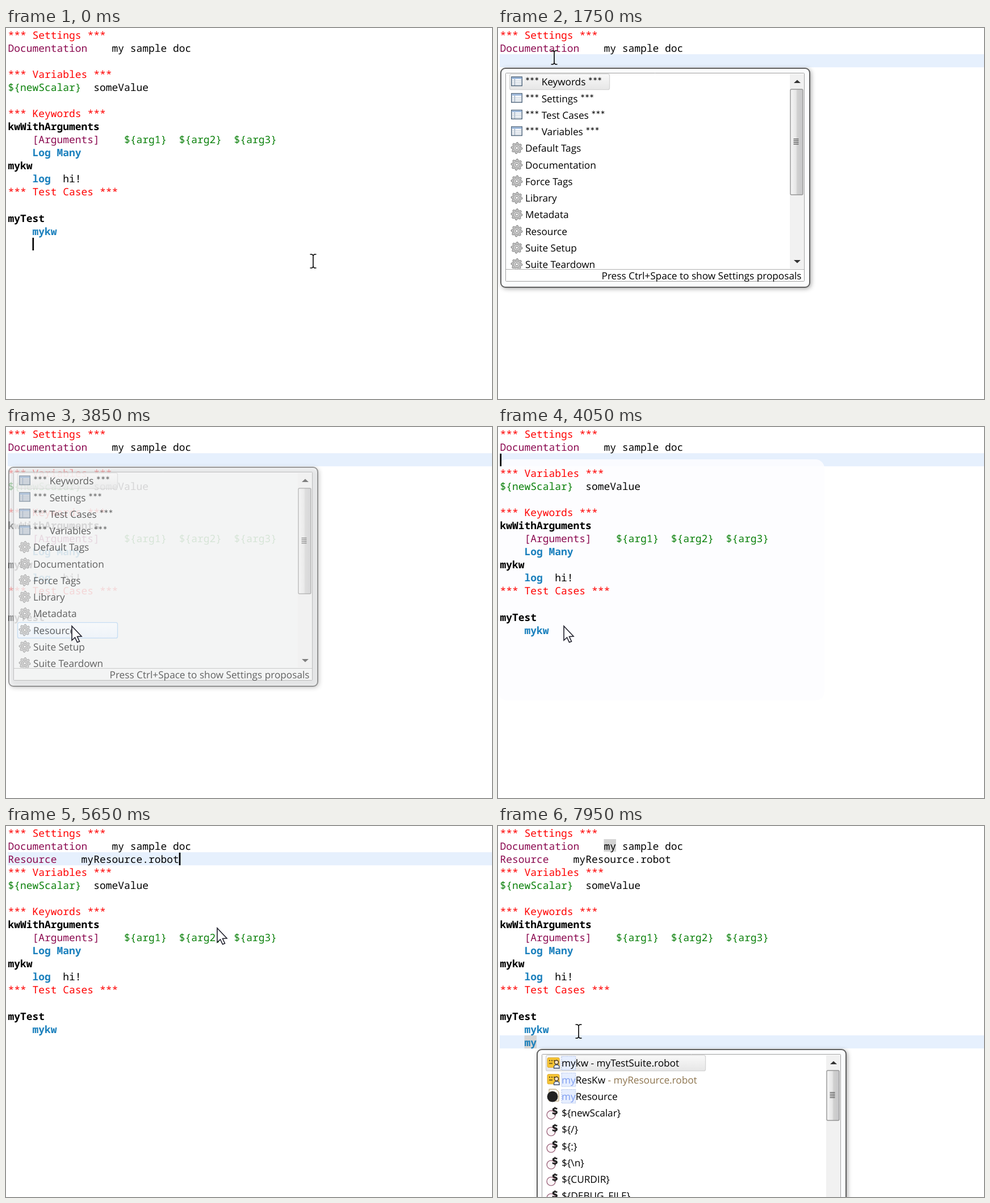
Animation, 856 px wide and 654 px high, one loop 8000 ms. Source, as an HTML page with a canvas:

```html
<!DOCTYPE html>
<html lang="en">
<head>
<meta charset="utf-8">
<title>Editor content assist</title>
<style>
html, body { margin: 0; width: 100%; height: 100%; overflow: hidden; background: #fff; }
canvas { display: block; }
</style>
</head>
<body>
<canvas id="stage" width="856" height="654"></canvas>
<script>
const ctx = document.getElementById('stage').getContext('2d');
const LOOP = 8000;
const CHAR = 10.76, LEFT = 3.5, LINE = 23.06, ROW = 29.27;
const MONO = '17.93px "Noto Sans Mono", monospace';
const UI = '500 17.2px "Open Sans", "Noto Sans", sans-serif';
const STARS = '19px Lato, sans-serif';
const RED = '#ff0000', PLUM = '#8b0a50', GREEN = '#0a800a', BLUE = '#1b80bd', BLACK = '#000';

// [line, column, text, colour, bold]
const doc = [
  [0, 0, '*** Settings ***', RED],
  [1, 0, 'Documentation', PLUM],
  [1, 17, 'my sample doc', BLACK],
  [3, 0, '*** Variables ***', RED],
  [4, 0, '${newScalar}', GREEN],
  [4, 14, 'someValue', BLACK],
  [6, 0, '*** Keywords ***', RED],
  [7, 0, 'kwWithArguments', BLACK, 1],
  [8, 4, '[Arguments]', PLUM],
  [8, 19, '${arg1}  ${arg2}  ${arg3}', GREEN],
  [9, 4, 'Log Many', BLUE, 1],
  [10, 0, 'mykw', BLACK, 1],
  [11, 4, 'log', BLUE, 1],
  [11, 9, 'hi!', BLACK],
  [12, 0, '*** Test Cases ***', RED],
  [14, 0, 'myTest', BLACK, 1],
  [15, 4, 'mykw', BLUE, 1]
];

const vars = ['${newScalar}', '${/}', '${:}', '${\\n}', '${CURDIR}', '${DEBUG_FILE}',
  '${EMPTY}', '${EXECDIR}', '${False}', '${LOG_FILE}', '${LOG_LEVEL}'];
const withIcon = (icon, names) => names.map(text => ({ icon, text }));

const settingsMenu = {
  x: 0, y: 0, select: 176, thumb: 186,
  rows: [
    ...withIcon(table, ['*** Keywords ***', '*** Settings ***', '*** Test Cases ***', '*** Variables ***']),
    ...withIcon(gear, ['Default Tags', 'Documentation', 'Force Tags', 'Library', 'Metadata',
      'Resource', 'Suite Setup', 'Suite Teardown'])
  ]
};
const resourceMenu = {
  x: 129, y: 0, select: 186, thumb: 104,
  rows: [{ icon: file, text: 'myResource.robot' }, ...withIcon(scalar, vars)]
};
const keywordMenu = {
  x: 64, y: 323, select: 281, thumb: 88,
  rows: [
    { icon: keyword, text: 'mykw - myTestSuite.robot', match: BLACK },
    { icon: keyword, text: 'myResKw', match: '#7d9cf0', tail: ' - myResource.robot' },
    { icon: file, text: 'myResource', match: '#7d9cf0' },
    ...withIcon(scalar, vars.slice(0, 9))
  ]
};

// Each track holds its value until the next time.
const mouse = [
  [0, 541, 411, beam], [500, 528, 385, beam], [650, 420, 255, beam], [800, 225, 115, beam],
  [1000, 99, 52, beam], [2200, 108, 78, arrow], [2350, 130, 130, arrow], [2500, 150, 190, arrow],
  [2650, 162, 245, arrow], [2800, 166, 284, arrow], [2950, 150, 312, arrow],
  [3050, 126, 336, arrow], [3200, 116, 351, arrow], [4550, 145, 322, arrow],
  [4700, 200, 245, arrow], [4850, 258, 158, arrow], [5000, 286, 112, arrow],
  [5200, 291, 96, arrow], [5650, 372, 180, arrow], [5800, 325, 300, arrow],
  [5950, 240, 295, arrow], [6100, 217, 281, arrow], [6450, 175, 335, beam], [6600, 142, 362, beam]
];
const caret = [
  [0, 16, 4], [1150, 2, 0], [1750, -1], [3900, 2, 0], [4150, 2, 12], [5650, 2, 28],
  [6800, 16, 4], [7000, 16, 5], [7150, 16, 6], [7450, -1]
];
const activeLine = [[0, -1], [1150, 2], [6800, 16]];
const popup = [
  [0, null, 0], [1650, settingsMenu, .5], [1750, settingsMenu, 1], [3750, settingsMenu, .6],
  [3900, settingsMenu, .2], [4050, null, 0], [4250, resourceMenu, .5], [4400, resourceMenu, 1],
  [5350, resourceMenu, .4], [5550, null, 0],
  [7650, keywordMenu, .4], [7800, keywordMenu, .9], [7950, keywordMenu, 1]
];

const at = (track, t) => track.findLast(k => k[0] <= t).slice(1);
const colX = c => LEFT + c * CHAR;
const lineY = n => .1 + n * LINE;

function box(x, y, w, h, fill) {
  ctx.fillStyle = fill;
  ctx.fillRect(x, y, w, h);
}

function round(x, y, w, h, r, fill, stroke, width = 1) {
  ctx.beginPath();
  ctx.roundRect(x, y, w, h, r);
  if (fill) { ctx.fillStyle = fill; ctx.fill(); }
  if (stroke) { ctx.strokeStyle = stroke; ctx.lineWidth = width; ctx.stroke(); }
}

function disc(x, y, r, fill, stroke, width = 1) {
  round(x - r, y - r, 2 * r, 2 * r, r, fill, stroke, width);
}

function poly(points, fill, stroke, width = 1) {
  ctx.beginPath();
  points.forEach(([x, y]) => ctx.lineTo(x, y));
  if (fill) { ctx.closePath(); ctx.fillStyle = fill; ctx.fill(); }
  if (stroke) { ctx.strokeStyle = stroke; ctx.lineWidth = width; ctx.stroke(); }
}

function shade(y, h, top, bottom) {
  const g = ctx.createLinearGradient(0, y, 0, y + h);
  g.addColorStop(0, top);
  g.addColorStop(1, bottom);
  return g;
}

function code([line, col, text, color, bold]) {
  ctx.font = (bold ? 'bold ' : '') + MONO;
  ctx.fillStyle = color;
  for (const word of text.matchAll(/\S+/g))
    ctx.fillText(word[0], colX(col + word.index), 18.7 + line * LINE);
}

// Asterisks use a narrower face. Returns the end of the text.
function label(text, x, y, color = BLACK) {
  ctx.fillStyle = color;
  for (const part of text.split(/(\*+)/)) {
    ctx.font = part[0] === '*' ? STARS : UI;
    ctx.fillText(part, x, y);
    x += ctx.measureText(part).width;
  }
  return x;
}

// Icons are drawn around the middle of their list row.
function table(x, y) {
  box(x - 10, y - 9, 20, 17, '#52687f');
  box(x - 8.5, y - 7.5, 17, 14, '#fff');
  box(x - 8.5, y - 7.5, 17, 3, '#9db9dc');
  box(x - 4, y - 4.5, 1, 11, '#7890a8');
  for (let i = 0; i < 3; i++) box(x - 8.5, y - 2 + i * 3, 17, 1, '#b4c2d2');
}

function gear(x, y) {
  const teeth = [];
  for (let i = 0; i < 32; i++) {
    const a = i * Math.PI / 16, r = i % 4 < 2 ? 10 : 7.8;
    teeth.push([x + r * Math.cos(a), y + r * Math.sin(a)]);
  }
  poly(teeth, '#c4c4c4', '#7d7d7d');
  disc(x, y, 5.5, '#d6d6d6', '#929292');
  disc(x, y, 2.5, '#fff', '#777');
}

function scalar(x, y) {
  disc(x - 3.5, y + 4, 7.5, '#fbf5f7', '#a06c82', 1.4);
  ctx.font = '800 18px "Open Sans", sans-serif';
  ctx.fillStyle = '#222';
  ctx.fillText('$', x - 2, y + 4);
}

function file(x, y) {
  poly([[x - 7, y - 12], [x + 5, y - 12], [x + 10, y - 7], [x + 10, y + 9], [x - 7, y + 9], [x - 7, y - 12]],
    '#fffaf0', '#a89060');
  disc(x - 1, y + 1, 9.5, '#222');
}

function keyword(x, y) {
  round(x - 10, y - 9, 21, 17, 2, '#f7c534', '#d9a52c');
  for (let i = 0; i < 3; i++) box(x - 7 + i * 4, y - 5, 2, 2, '#5c4a20');
  box(x - 7, y, 6, 2, '#7a6020');
  disc(x + 6, y - 1, 3.5, '#fbe3c4', '#4a3820', 1.4);
  round(x + 1.5, y + 3.5, 9.5, 6, [4, 4, 0, 0], '#e8eef8', '#42506c', 1.4);
}

function beam(x, y) {
  ctx.strokeStyle = '#000';
  ctx.lineWidth = 1.6;
  ctx.beginPath();
  ctx.moveTo(x, y - 10);
  ctx.lineTo(x, y + 10);
  for (const s of [-1, 1]) {
    ctx.moveTo(x - 5.5, y + s * 12);
    ctx.lineTo(x - 2, y + s * 12);
    ctx.lineTo(x, y + s * 10);
    ctx.lineTo(x + 2, y + s * 12);
    ctx.lineTo(x + 5.5, y + s * 12);
  }
  ctx.stroke();
}

function arrow(x, y) {
  const shape = [[0, 0], [0, 25], [5.5, 20], [9.5, 28.5], [13.5, 27], [9.5, 18.5], [17, 18], [0, 0]];
  poly(shape.map(([a, b]) => [x + a, y + b]), '#fff', '#20202c', 1.6);
}

function scrollbar(thumb) {
  box(514, 81, 24.5, 343, '#f1f1f1');
  poly([[521, 97], [527, 91.5], [533, 97]], '#333');
  poly([[521, 409], [527, 414.5], [533, 409]], '#333');
  const g = ctx.createLinearGradient(515, 0, 537, 0);
  g.addColorStop(0, '#f6f6f6');
  g.addColorStop(.45, '#e6e6e6');
  g.addColorStop(.55, '#d0d0d0');
  g.addColorStop(1, '#c6c6c8');
  round(515, 108, 22, thumb, 2, g, '#979797', 1.4);
  for (let i = 0; i < 4; i++) box(520.5, 102 + thumb / 2 + i * 3, 9, 1.4, '#5c5c5c');
}

function selection(i, w, hover) {
  const y = 81.2 + i * ROW;
  const [top, bottom, edge] = i === 0 && hover ? ['#e4effc', '#c6defa', '#7da2ce']
    : hover ? ['#fafcff', '#ebf3fd', '#a9cdf0'] : ['#f9f9f9', '#e6e6e6', '#d4d4d4'];
  round(20.5, y, w, 27.5, 3, shade(y, 27.5, top, bottom), edge, 1.3);
}

function row({ icon, text, match, tail }, i) {
  const mid = 95 + i * ROW, base = mid + 6.3;
  icon(33, mid - .5);
  let x = 48;
  if (match) {
    ctx.font = UI;
    const w = ctx.measureText('my').width;
    box(x, mid - 12, w, 24, '#e6eeff');
    ctx.setLineDash([1.5, 2]);
    round(x, mid - 12, w, 24, 0, null, '#8fa8e0');
    ctx.setLineDash([]);
    x = label('my', x, base, match);
    text = text.slice(2);
  }
  x = label(text, x, base);
  if (tail) label(tail, x, base, '#8f7650');
}

function menu({ x, y, select, thumb, rows }, alpha, mx, my) {
  ctx.save();
  ctx.globalAlpha = alpha;
  ctx.translate(x, y);
  ctx.save();
  ctx.shadowColor = 'rgba(0,0,0,.4)';
  ctx.shadowBlur = 8;
  ctx.shadowOffsetX = ctx.shadowOffsetY = 2;
  round(5, 71, 544, 386, 8, '#fbfcfd');
  ctx.restore();
  round(5, 71, 544, 386, 8, null, '#606060', 2);
  round(13.5, 79.5, 526, 367, 1, '#fff', '#a0a0a0');

  ctx.save();
  ctx.beginPath();
  ctx.rect(14, 80, 500, 344.5);
  ctx.clip();
  const px = mx - x, py = my - y;
  const inside = px > 14 && px < 514 && py > 81 && py < 424;
  const hover = inside ? Math.floor((py - 81) / ROW) : -1;
  selection(0, select, hover === 0);
  if (hover > 0) selection(hover, select, true);
  rows.forEach(row);
  ctx.restore();

  scrollbar(thumb);
  box(14, 425, 525, 1, '#b0b0b0');
  ctx.textAlign = 'right';
  label('Press Ctrl+Space to show Settings proposals', 534.5, 443.2);
  ctx.restore();
}

function squiggle() {
  const points = [];
  for (let x = 3; x <= 90; x += 2.7) points.push([x, points.length % 2 ? 68 : 65]);
  poly(points, null, '#d0408c', 1.3);
}

function draw(t) {
  box(0, 0, 856, 654, '#fff');
  const [active] = at(activeLine, t);
  if (active >= 0) box(3, lineY(active), 853, LINE, '#e6f0fd');

  // Last trace of the closing popup over the active line.
  if (t >= 4050 && t < 4150) round(0, 57, 575, 425, 16, 'rgba(253,253,255,.9)');

  if (t >= 7450) {
    box(colX(17), lineY(1), CHAR * 2, LINE - 1, '#d4d4d4');
    box(colX(4), lineY(16), CHAR * 2, LINE, '#d4d4d4');
  }
  doc.forEach(code);
  if (t >= 4150) code([2, 0, 'Resource', PLUM]);
  if (t >= 5650) code([2, 12, 'myResource.robot', BLACK]);
  if (t >= 4550 && t < 5550) squiggle();
  if (t >= 7000) code([16, 4, t < 7150 ? 'm' : 'my', BLUE, 1]);

  const [line, col] = at(caret, t);
  if (line >= 0) box(colX(col) - .1, lineY(line) + .7, 2.7, 22.3, BLACK);

  const [mx, my, pointer] = at(mouse, t);
  const [list, alpha] = at(popup, t);
  if (list) menu(list, alpha, mx, my);
  pointer(mx, my);
}

ctx.textRendering = 'geometricPrecision';
const start = performance.now();
function tick() {
  draw((performance.now() - start) % LOOP);
  requestAnimationFrame(tick);
}
tick();
</script>
</body>
</html>
```
